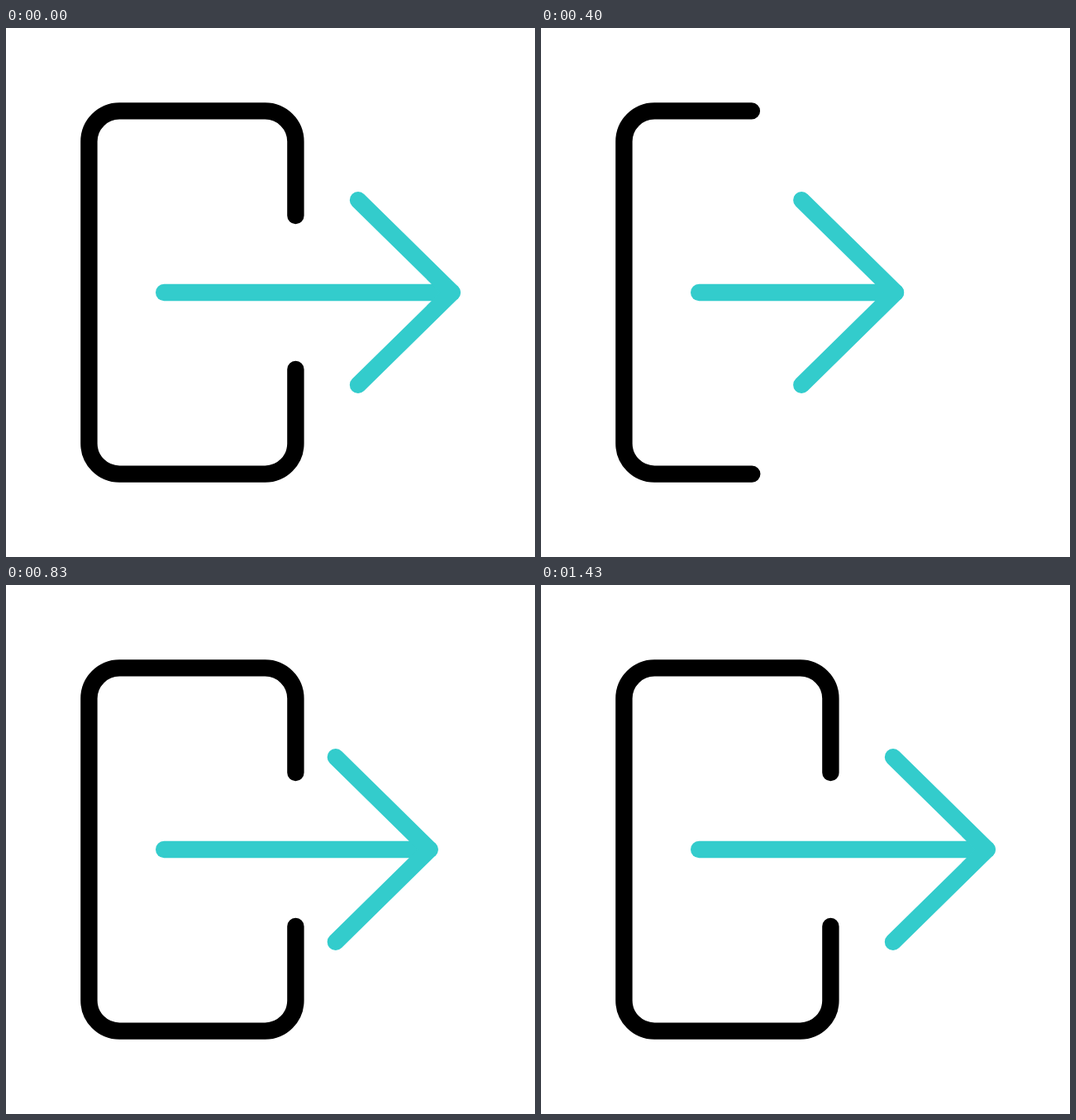
An HTML page for the animation above (2000 ms loop, 640 px wide and 640 px high).

```html
<!DOCTYPE html>
<html lang="en">
<head>
<meta charset="utf-8">
<title>Exit icon</title>
<style>
  html, body { margin: 0; width: 100%; height: 100%; overflow: hidden; background: #fff; }
  svg { display: block; width: 100%; height: 100%; }
  path { fill: none; stroke-width: 20.4; stroke-linecap: round; stroke-linejoin: round; }
  #door { stroke: #000; }
  #shaft, #head { stroke: #33cccc; }
</style>
</head>
<body>
<svg viewBox="0 0 640 640">
  <path id="door" d="M350.4 227V137.3A36.9 36.9 0 0 0 313.5 100.4H137.3A36.9 36.9 0 0 0 100.4 137.3V502.7A36.9 36.9 0 0 0 137.3 539.6H313.5A36.9 36.9 0 0 0 350.4 502.7V413"/>
  <path id="shaft"/>
  <path id="head" d="M426 208.2L539.7 320L426 431.8"/>
</svg>
<script>
  const LOOP = 2000;
  // [frame at 30 fps, value], eased in and out between entries
  const SLIDE = [[0, 0], [14, -117.2], [22, 1], [28, -55.3], [40, 4], [43, 0]];
  const TRIM = [[5, 0], [14, 236], [22, 0]];

  const [door, shaft, head] = ['door', 'shaft', 'head'].map(id => document.getElementById(id));
  const doorLength = door.getTotalLength();

  function valueAt(keys, frame) {
    if (frame <= keys[0][0]) return keys[0][1];
    for (let i = 1; i < keys.length; i++) {
      const [f0, v0] = keys[i - 1], [f1, v1] = keys[i];
      if (frame <= f1) {
        const p = (frame - f0) / (f1 - f0);
        return v0 + (v1 - v0) * p * p * (3 - 2 * p);
      }
    }
    return keys[keys.length - 1][1];
  }

  function draw(ms) {
    // 30 fps steps, with starts rounded to 10 ms
    const frame = Math.floor((Math.floor(ms / 10) + 0.5) * 0.3);
    const dx = valueAt(SLIDE, frame);
    const cut = valueAt(TRIM, frame);
    head.setAttribute('transform', `translate(${dx} 0)`);
    shaft.setAttribute('d', `M191.2 320H${539.7 + dx}`);
    door.style.strokeDasharray = cut ? `${doorLength - 2 * cut} ${doorLength}` : 'none';
    door.style.strokeDashoffset = -cut;
  }

  const start = performance.now();
  function tick() {
    draw((performance.now() - start) % LOOP);
    requestAnimationFrame(tick);
  }
  tick();
</script>
</body>
</html>
```
